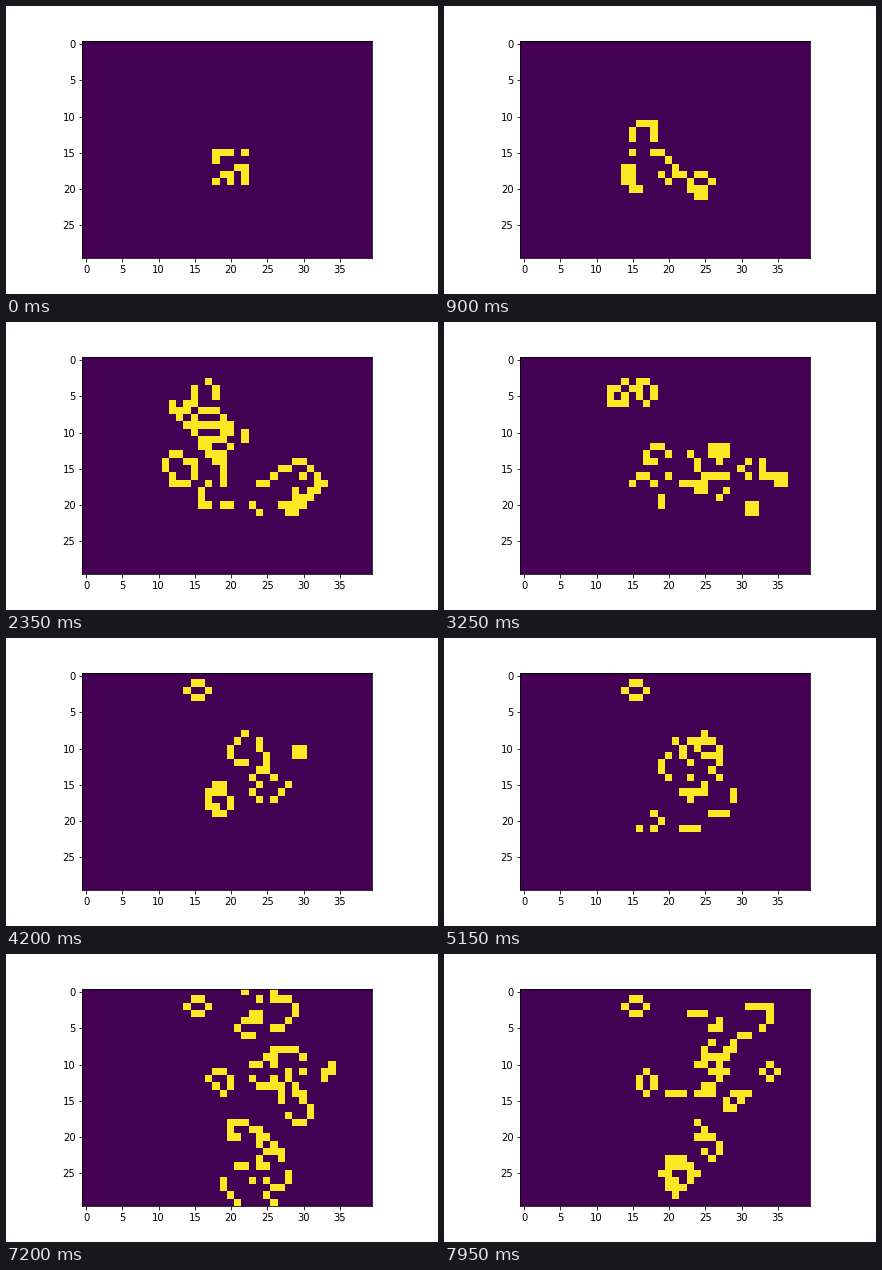
A matplotlib script for the animation above (8000 ms loop, 432 by 288 pixels).

```python
import numpy as np
import matplotlib.pyplot as plt
from matplotlib.animation import FuncAnimation

ROWS, COLS = 30, 40
FRAMES, INTERVAL = 160, 50
SEED = ["11101",
        "10000",
        "00011",
        "01101",
        "10101"]


def life_step(grid):
    """Advance Conway's Game of Life by one generation on a torus."""
    around = sum(np.roll(grid, (dy, dx), (0, 1))
                 for dy in (-1, 0, 1) for dx in (-1, 0, 1)
                 if (dy, dx) != (0, 0))
    return ((around == 3) | ((grid == 1) & (around == 2))).astype(int)


def generations(count):
    grid = np.zeros((ROWS, COLS), int)
    grid[15:20, 18:23] = [[int(c) for c in row] for row in SEED]
    history = [grid]
    while len(history) < count:
        history.append(life_step(history[-1]))
    return history


history = generations(FRAMES)

plt.rcParams.update({"font.family": "DejaVu Sans", "font.size": 10})
fig, ax = plt.subplots(figsize=(6, 4), dpi=72)
fig.subplots_adjust(left=0.125, right=0.9, bottom=0.125, top=0.88)
image = ax.imshow(history[0], cmap="viridis", vmin=0, vmax=1,
                  interpolation="nearest")
ax.set_xticks(range(0, COLS, 5))
ax.set_yticks(range(0, ROWS, 5))


def draw(i):
    image.set_data(history[i])
    return (image,)


anim = FuncAnimation(fig, draw, frames=FRAMES, interval=INTERVAL,
                     repeat=True, repeat_delay=0)
plt.show()
```
